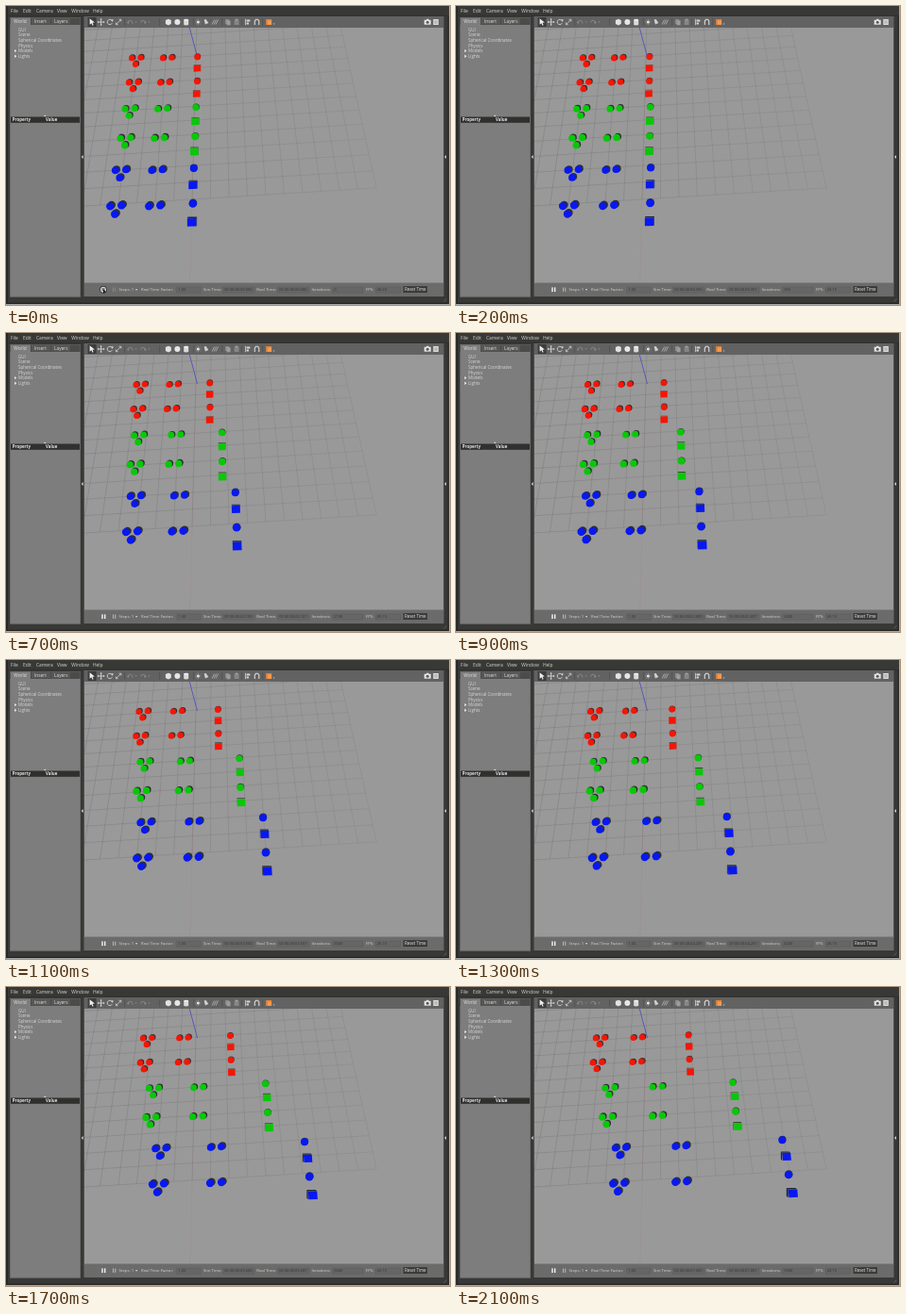
These frames come from a looping animation (470x317 px, 2200 ms). An HTML page with a canvas:

```html
<!DOCTYPE html>
<html lang="en">
<head>
<meta charset="utf-8">
<title>Simulation view</title>
<style>
html, body { margin: 0; width: 100%; height: 100%; overflow: hidden; background: #383836; }
canvas { display: block; width: 470px; height: 317px; }
</style>
</head>
<body>
<canvas id="stage" width="470" height="317"></canvas>
<script>
const c = document.getElementById('stage').getContext('2d');
const LOOP = 2200, STEP = 100;
const SANS = '"Open Sans", "Noto Sans", sans-serif';
const RISE = 0.067;
const LEFT = 82.5, WIDE = 381;

// y: ball row; t, p: triplet and pair x from/to; s, b: sphere and box x, y, x end
const rows = [
  { col: '#f51505', y: 55,  r: 3.4, t: [133.5, 148.3], p: [166.4, 188],   s: [202.6, 54, 246],   b: [202.4, 66, 246.6] },
  { col: '#f51505', y: 81,  r: 3.5, t: [130.4, 145.2], p: [163.6, 187],   s: [202.4, 79.7, 247], b: [201.8, 93, 248] },
  { col: '#08c808', y: 109, r: 3.7, t: [126.3, 158],   p: [160.8, 208.3], s: [201, 107.5, 293],  b: [200.4, 122.3, 295] },
  { col: '#08c808', y: 140, r: 3.9, t: [121.5, 155],   p: [157.2, 208],   s: [200.2, 138.3, 296], b: [199.5, 154.3, 298] },
  { col: '#0818f0', y: 174, r: 4.1, t: [116, 169],     p: [154.6, 232.5], s: [198.7, 172, 345.3], b: [198, 189.7, 349] },
  { col: '#0818f0', y: 212, r: 4.4, t: [110.5, 166.5], p: [151.5, 232.5], s: [197.8, 209.3, 352], b: [197, 229, 355.5] }
];

function rect(x, y, w, h, fill) { c.fillStyle = fill; c.fillRect(x, y, w, h); }

function frame(x, y, w, h, col) {
  c.strokeStyle = col;
  c.lineWidth = 0.6;
  c.strokeRect(x, y, w, h);
}

function line(pts, col, w = 0.8) {
  c.strokeStyle = col;
  c.lineWidth = w;
  c.beginPath();
  pts.forEach(([x, y], i) => i ? c.lineTo(x, y) : c.moveTo(x, y));
  c.stroke();
}

function shape(pts, fill) {
  c.fillStyle = fill;
  c.beginPath();
  pts.forEach(([x, y]) => c.lineTo(x, y));
  c.closePath();
  c.fill();
}

function disc(x, y, rx, fill, ry = rx) {
  c.fillStyle = fill;
  c.beginPath();
  c.ellipse(x, y, rx, ry, 0, 0, 7);
  c.fill();
}

function text(s, x, y, col, size = 5, weight = 400) {
  c.font = `${weight} ${size}px ${SANS}`;
  c.fillStyle = col;
  c.fillText(s, x, y);
}

// Ground plane to screen: u runs towards the viewer, v to the right
function ground(u, v) {
  const w = 1 - 0.019 * u;
  return [(201 - 4.14 * u + 15.8 * v) / w, (53 + 11.3 * u - 0.98 * v) / w];
}

function drawGrid() {
  const ink = c.createLinearGradient(80, 0, 395, 0);
  ink.addColorStop(0, 'rgba(55,55,55,.24)');
  ink.addColorStop(1, 'rgba(55,55,55,.13)');
  for (let i = -10; i <= 10; i++) {
    line([ground(-10, i), ground(10, i)], ink, 0.65);
    line([ground(i, -10), ground(i, 10)], ink, 0.65);
  }
  line([ground(0, 0), ground(16, 0)], 'rgba(170,80,80,.14)', 0.6);
  line([[194.3, 23], [202.5, 54]], '#4a4ac4', 0.8);
}

function ball(x, y, r, col) {
  const k = r - 2.6;
  disc(x + 0.2 + k * 0.6, y - k * 0.55, r * 0.94, '#2c2e30');
  disc(x - 0.3, y + 0.3, r * 0.94, col);
}

function box(x, y, r, col) {
  const h = r * 1.08, deep = r - 2.9;
  const ox = (240 - x) / 90 * deep, oy = -deep;
  const l = x - h - ox / 2, q = x + h - ox / 2, a = y - h - oy / 2, z = y + h;
  const side = col === '#0818f0' ? '#222733' : '#43433a';
  shape([[l, a], [l + ox, a + oy], [q + ox, a + oy], [q, a]], side);
  const e = ox > 0 ? q : l;
  shape([[e, a], [e + ox, a + oy], [e + ox, z + oy], [e, z]], side);
  const lean = (x - 200) / 200;
  shape([[l, a + 0.3], [q, a], [q + lean, z - 0.3], [l + lean, z]], col);
}

function drawRow(o, p) {
  const at = ([from, to]) => [from + (to - from) * p, o.y - (to - from) * RISE * p];
  const gap = o.r * 2.73;
  const [tx, ty] = at(o.t), [px, py] = at(o.p);
  ball(tx, ty, o.r, o.col);
  ball(tx + gap, ty - gap * 0.07, o.r, o.col);
  ball(tx + gap * 0.41, ty + gap * 0.7, o.r, o.col);
  ball(px, py, o.r, o.col);
  ball(px + gap, py - gap * 0.07, o.r, o.col);
  const slide = ([x, y, end]) => [x + (end - x) * p, y - (end - x) * RISE * p];
  const [sx, sy] = slide(o.s), [bx, by] = slide(o.b);
  disc(sx + 0.3, sy - 0.5, o.r * 0.97, '#34363a');
  disc(sx, sy + 0.1, o.r * 0.97, o.col);
  box(bx, by, o.r, o.col);
}

function drawScene(p) {
  c.save();
  c.beginPath();
  c.rect(LEFT, 23, WIDE, 271);
  c.clip();
  rect(LEFT, 23, WIDE, 271, '#999');
  drawGrid();
  rows.forEach(o => drawRow(o, p));
  c.restore();
}

function drawMenu() {
  const items = [['File', 5], ['Edit', 18], ['Camera', 32], ['View', 54], ['Window', 69.3], ['Help', 92]];
  items.forEach(([s, x]) => text(s, x, 6.7, '#d6d6d0', 4.9));
}

function drawPanel() {
  rect(4, 12, 75, 296.5, '#7d7d7d');
  rect(4, 12, 75, 8, '#4b4b4a');
  rect(5, 12, 21, 8, '#7d7d7d');
  rect(27, 12.5, 20, 7, '#575756');
  rect(48, 12.5, 20, 7, '#575756');
  text('World', 8.3, 17.8, '#e4e4e4', 4.8);
  text('Insert', 30, 17.8, '#dcdcdc', 4.8);
  text('Layers', 51, 17.8, '#dcdcdc', 4.8);
  ['GUI', 'Scene', 'Spherical Coordinates', 'Physics', 'Models', 'Lights'].forEach((s, i) => {
    const y = 26.5 + i * 5.7;
    text(s, 13, y, '#d8d8d8', 4.5);
    if (i > 3) shape([[9, y - 3.4], [11.4, y - 1.7], [9, y]], '#e4e4e4');
  });
  shape([[39.8, 117], [42.6, 117], [41.2, 115.6]], '#ddd');
  rect(5, 117.5, 73, 6.3, '#30302f');
  text('Property', 6.8, 122.3, '#e6e6e6', 4.4, 700);
  text('Value', 42, 122.3, '#e6e6e6', 4.4, 700);
  frame(4.3, 12.3, 74.4, 295.9, '#626261');
}

function lamp(x, w) {
  disc(x, 17, w, '#e6e6e6');
  for (let i = 0; i < 8; i++) {
    const a = i * Math.PI / 4, m = Math.cos(a), n = Math.sin(a);
    line([[x + m * 2.2, 17 + n * 2.2], [x + m * 3.2, 17 + n * 3.2]], '#d0d0d0', 0.5);
  }
}

function turn(x, dir, col) {
  c.strokeStyle = col;
  c.lineWidth = 0.9;
  c.beginPath();
  c.arc(x, 17.6, 2.3, Math.PI, Math.PI * 2.2);
  c.stroke();
  const e = x - dir * 2.3;
  shape([[e - 1.5, 16.8], [e + 1.5, 16.8], [e, 19]], col);
}

function drawTools() {
  rect(LEFT, 11, WIDE, 12, '#626262');
  c.save();
  c.translate(0.6, 0);
  rect(86, 12, 9, 10, '#3d3d3d');
  shape([[88, 13.3], [93.3, 17.4], [91, 17.8], [92, 20.3], [90.9, 20.7], [89.9, 18.3], [88, 19.8]], '#eee');
  line([[97, 17], [103, 17]], '#dcdcdc');
  line([[100, 14], [100, 20]], '#dcdcdc');
  [[97, 17], [103, 17], [100, 14], [100, 20]].forEach(([x, y]) => disc(x, y, 0.8, '#e2e2e2'));
  c.strokeStyle = '#dcdcdc';
  c.beginPath();
  c.arc(109.3, 17, 2.7, 0.4, 5.8);
  c.stroke();
  shape([[110.5, 14.5], [113, 14.2], [112.3, 17]], '#dcdcdc');
  line([[116, 19.5], [121, 14.5]], '#d4d4d4');
  line([[119, 14.3], [121.2, 14.3], [121.2, 16.5]], '#d4d4d4');
  line([[115.8, 17.5], [115.8, 19.7], [118, 19.7]], '#d4d4d4');
  turn(131, 1, '#8a8a8a');
  turn(144.5, -1, '#8a8a8a');
  [137, 151].forEach(x => shape([[x - 1, 16.5], [x + 1, 16.5], [x, 17.8]], '#959595'));
  [125, 162, 198, 228, 249, 271].forEach(x => line([[x, 13], [x, 21]], '#4c4c4c', 0.6));
  shape([[168.3, 15], [171.3, 13.7], [174.2, 15], [174.2, 19], [171.3, 20.5], [168.3, 19]], '#e2e2e2');
  disc(180.8, 17, 3, '#e6e6e6');
  rect(187.6, 14.7, 5, 5, '#dadada');
  disc(190.1, 14.7, 2.5, '#f0f0f0', 0.9);
  disc(190.1, 19.6, 2.5, '#dadada', 0.9);
  lamp(202.8, 1.5);
  shape([[209, 14.5], [211, 13.9], [213.8, 18], [210.3, 19.4]], '#d0d0d0');
  [0, 2, 4].forEach(d => line([[217.5 + d, 19.5], [220 + d, 14.5]], '#c4c4c4', 0.7));
  rect(231.5, 14, 4, 5, '#8a8a8a');
  rect(233, 15.3, 4, 5, '#9c9c9c');
  rect(241, 14.5, 5, 5.5, '#868686');
  rect(242.3, 13.7, 2.4, 1.5, '#a5a5a5');
  line([[253, 13.8], [253, 20.2]], '#e0e0e0');
  rect(254, 14.5, 3.8, 2, '#d4d4d4');
  rect(254, 17.5, 2.4, 2, '#d4d4d4');
  line([[262.7, 20], [262.7, 16], [264, 14.3], [266, 14.3], [267.2, 16], [267.2, 20]], '#dadada', 1.1);
  rect(274.5, 14, 6, 6, '#df8138');
  rect(276.3, 15.4, 4.2, 4.5, '#ef9c58');
  shape([[282, 18.5], [284, 18.5], [283, 20]], '#bbb');
  c.restore();
  rect(442.7, 14.8, 7, 4.9, '#e4e4e4');
  rect(445, 13.8, 2.5, 1.2, '#e4e4e4');
  disc(446.2, 17.3, 1.5, '#5b5b5b');
  rect(452.3, 14, 5.5, 6, '#dedede');
  line([[453.4, 16], [456.7, 16]], '#666', 0.6);
  line([[453.4, 18], [456.7, 18]], '#666', 0.6);
}

const pad = (n, w) => String(n).padStart(w, '0');
const clock = ms => `00 00:00:${pad(Math.floor(ms / 1000), 2)}.${pad(ms % 1000, 3)}`;

function field(label, lx, x, w, value) {
  text(label, lx, 302.2, '#d4d4d0', 4.3);
  rect(x, 298, w, 6, '#666');
  frame(x, 298, w, 6, '#5b5b5b');
  text(value, x + 1.4, 302.2, '#343434', 4);
}

function drawStatus(i, sim) {
  rect(LEFT, 293.5, WIDE, 14.5, '#6b6b6b');
  if (i === 0) {
    disc(103, 300.7, 3.9, '#3a3a3a');
    disc(103, 300.7, 2.9, '#e8e8e8');
    rect(101.6, 298.9, 1, 3.4, '#333');
    rect(103.4, 298.9, 1, 3.4, '#333');
    shape([[103, 300], [106, 303.5], [104.5, 303.5], [103, 305]], '#181818');
  } else {
    rect(101.3, 298.3, 1.4, 4.7, '#f0f0f0');
    rect(104, 298.3, 1.4, 4.7, '#f0f0f0');
  }
  const dim = i ? '#cfcfcf' : '#909090';
  rect(113, 298.5, 0.8, 4.3, dim);
  rect(115.4, 298.5, 0.8, 4.3, dim);
  text('Steps: 1', 119.5, 302.2, '#d4d4d0', 4.3);
  shape([[137, 300], [139.2, 300], [138.1, 301.7]], '#ddd');
  field('Real Time Factor:', 143, 181, 25, '1.00');
  field('Sim Time:', 209, 229.8, 33, clock(sim));
  field('Real Time:', 265.3, 287.8, 33, clock(sim ? sim + 7 : 0));
  field('Iterations:', 323.5, 345.8, 32, String(sim));
  field('FPS:', 381, 391.3, 26, i ? '49.15' : '40.20');
  rect(420.5, 297, 25.5, 7, '#3b3b3a');
  text('Reset Time', 422, 302.1, '#e6e6e6', 4.4);
}

function drawWindow() {
  rect(0, 0, 470, 317, '#383836');
  rect(0, 0, 2, 317, '#272727');
  rect(0, 9.8, 470, 0.7, '#2d2d2c');
  rect(2, 314.5, 468, 2.5, '#292928');
  rect(467.5, 10, 2.5, 307, '#2a2a2a');
  rect(469, 0, 1, 317, '#aaa');
  rect(0, 316, 470, 1, '#aaa');
  drawMenu();
  drawPanel();
  shape([[81.6, 158], [81.6, 162], [79.8, 160]], '#ddd');
  shape([[466, 158], [466, 162], [464.2, 160]], '#ddd');
  line([[463.5, 313.5], [466.5, 310.5]], '#777', 0.6);
  drawTools();
}

function draw(now) {
  const i = Math.floor((now % LOOP) / STEP);
  const run = Math.max(0, i - 1);
  drawWindow();
  drawScene(run / 20);
  drawStatus(i, run * 350);
  requestAnimationFrame(draw);
}
draw(0);
</script>
</body>
</html>
```
